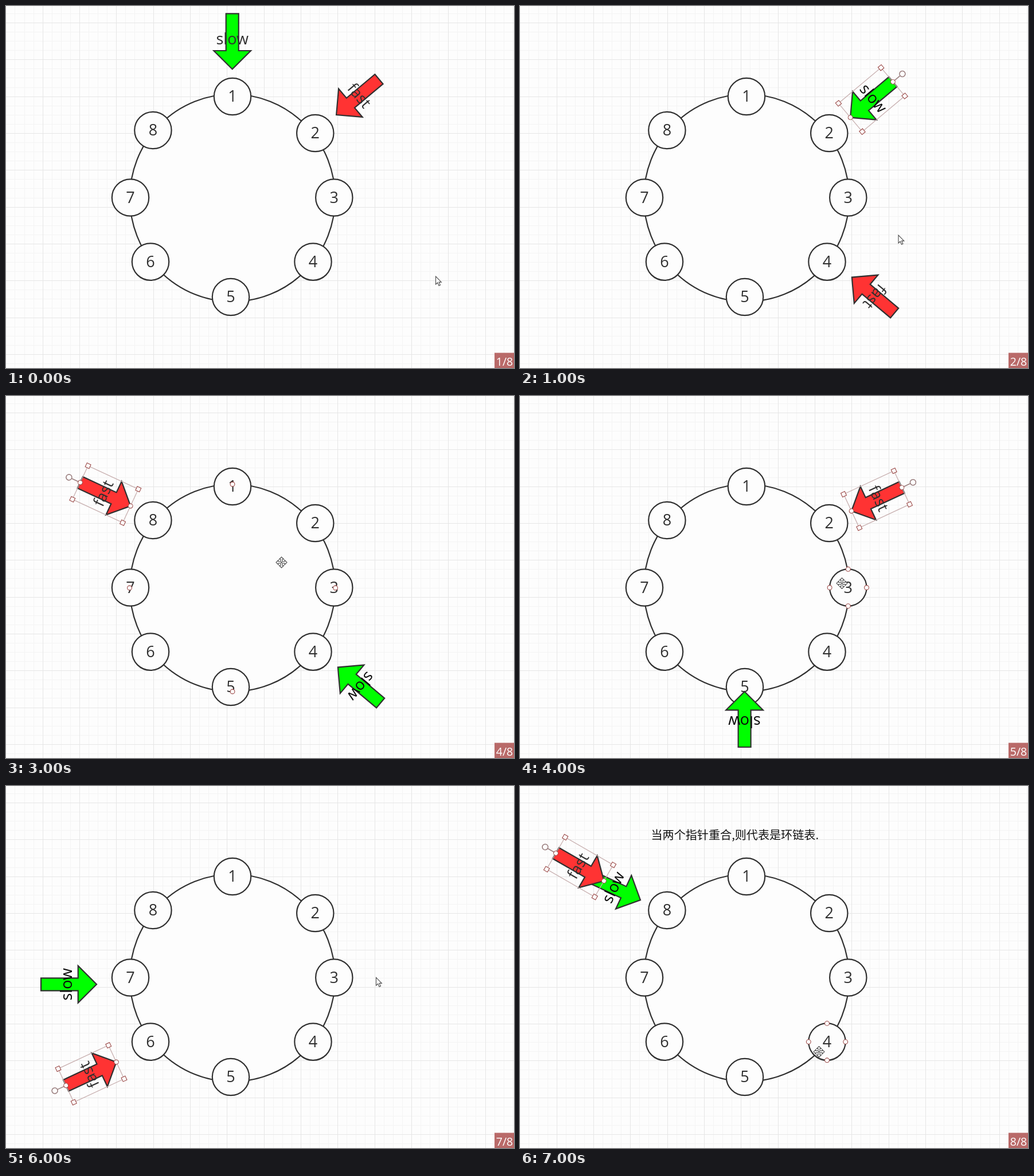
An HTML page that plays this animation: 886x632 px, repeating every 8000 ms.

```html
<!DOCTYPE html>
<html lang="zh-CN">
<head>
<meta charset="utf-8">
<title>Fast and slow pointers</title>
<style>
  html, body { margin: 0; width: 100%; height: 100%; overflow: hidden; background: #fdfdfd; }
  svg { display: block; width: 886px; height: 632px; }
  text { font-family: "Open Sans", "Noto Sans", sans-serif; text-anchor: middle; }
  .shape { stroke: #303030; stroke-width: 2.2; }
  .node { fill: #fdfdfd; }
  .label { font-size: 27px; fill: #303030; }
  .dark { fill: #0a0a0a; }
  .handle { fill: #fff; stroke: #9c4a48; stroke-width: 1.1; }
  .turn { fill: #fff; stroke: #9c8080; stroke-width: 1.6; }
  .frame { fill: none; stroke: #c8b0b0; stroke-width: 1.3; }
  .cursor { fill: #fff; stroke: #4a4a4a; stroke-width: 1.1; }
  .note { font: 20.1px "Noto Sans CJK SC", "Noto Sans CJK", sans-serif; fill: #111; text-anchor: start; }
</style>
</head>
<body>
<svg id="stage" viewBox="0 0 886 632"></svg>
<script>
const STEP_MS = 1000;
const NODE_R = 32.2;
const nodes = [[395, 158], [539.3, 222], [572.3, 334.5], [535.5, 446.6],
               [392, 508], [252, 446.6], [217, 334.5], [256.4, 217]];
const ring = { x: 395, y: 335, rx: 179, ry: 181 };

// slow, fast: centre x, centre y, angle; hover: node number or "ring"
const steps = [
  { slow: [394.7, 61.8, 0], fast: [613.3, 158.8, 50], pointer: [749.5, 472] },
  { slow: [613.3, 163.5, 50], fast: [616, 504.8, 130], selected: "slow", pointer: [660, 400] },
  { slow: [669.7, 334.8, 90], fast: [169.5, 508, 230], selected: "slow", pointer: [572.5, 416.7] },
  { slow: [616, 504.8, 130], fast: [173.3, 171.5, 295], selected: "fast", move: [480.5, 290.5], hover: "ring" },
  { slow: [391.6, 564.5, 180], fast: [622, 180.3, 65], selected: "fast", move: [561.5, 327], hover: 3 },
  { slow: [160.5, 508, 230], fast: [622, 490, 115], selected: "fast", move: [452, 408], hover: "ring" },
  { slow: [109.5, 346.3, 270], fast: [148.5, 502.4, 245], selected: "fast", pointer: [645.5, 334.3] },
  { slow: [166, 178.5, 295], fast: [104.5, 141.5, 300], selected: "fast", move: [521.5, 464], hover: 4,
    note: "当两个指针重合,则代表是环链表." }
];

const dot = (x, y) => `<circle class="handle" cx="${x}" cy="${y}" r="3.9"/>`;
const square = (x, y) => `<rect class="handle" x="${x - 3.7}" y="${y - 3.7}" width="7.4" height="7.4"/>`;
const place = ([x, y, angle = 0], body) =>
  `<g transform="translate(${x} ${y}) rotate(${angle})">${body}</g>`;

function gridLines(spacing, color) {
  let d = "";
  for (let x = 64.2 % spacing; x < 886; x += spacing) d += `M${Math.floor(x) + .5} 0V632`;
  for (let y = 29.5 % spacing; y < 632; y += spacing) d += `M0 ${Math.floor(y) + .5}H886`;
  return `<path d="${d}" stroke="${color}" fill="none"/>`;
}

function arrow(pose, name, fill, dark) {
  return place(pose,
    `<path class="shape" fill="${fill}" d="M-11-48.5H11V16.2H32.3L0 48.5L-32.3 16.2H-11Z"/>
     <text class="label ${dark ? "dark" : ""}" y="5.5">${name}</text>`);
}

function selection(pose) {
  const corners = [[-1, -1], [1, -1], [1, 1], [-1, 1]];
  return place(pose,
    `<rect class="frame" x="-32.3" y="-48.4" width="64.6" height="96.8"/>
     <path class="turn" d="M0-48.4V-65"/>
     <circle class="turn" cy="-70" r="5"/>
     ${corners.map(([x, y]) => square(x * 32.3, y * 48.4)).join("")}${dot(0, -48.4)}${dot(0, 48.4)}`);
}

function hoverDots(target) {
  const [x, y, rx, ry] = target === "ring"
    ? [ring.x, ring.y, ring.rx + .5, ring.ry]
    : [...nodes[target - 1], NODE_R, NODE_R];
  return dot(x, y - ry) + dot(x + rx, y) + dot(x, y + ry) + dot(x - rx, y);
}

function moveCursor(at) {
  const quarter = "L-1.5-1.5V-5.5H-4L0-9.5L4-5.5H1.5V-1.5";
  const arms = [0, 90, 180, 270].map(a => `<path class="cursor" transform="rotate(${a})" d="M-1.5-1.5${quarter}"/>`);
  return place(at, arms.join("") + `<rect x="-1.2" y="-1.2" width="2.4" height="2.4" fill="#4a4a4a"/>`);
}

const pointerCursor = at =>
  place(at, `<path class="cursor" d="M0 0V14L3.2 11L5.5 16.3L7.9 15.2L5.6 10.1H9.8Z"/>`);

const backdrop = gridLines(16.08, "#f4f4f4") + gridLines(64.32, "#e6e6e6") +
  `<ellipse class="shape node" cx="${ring.x}" cy="${ring.y}" rx="${ring.rx}" ry="${ring.ry}"/>` +
  nodes.map((at, i) => place(at,
    `<circle class="shape node" r="${NODE_R}"/><text class="label" y="9.3">${i + 1}</text>`)).join("");

function scene(step, index) {
  return arrow(step.slow, "slow", "#00ff00", index > 0) +
    arrow(step.fast, "fast", "#ff3333", false) +
    (step.selected ? selection(step[step.selected]) : "") +
    (step.hover ? hoverDots(step.hover) : "") +
    (step.note ? `<text class="note" x="228.5" y="93">${step.note}</text>` : "") +
    (step.move ? moveCursor(step.move) : pointerCursor(step.pointer)) +
    `<rect x="852" y="605.5" width="34" height="26.5" fill="#b96a69"/>
     <text x="869.5" y="627.5" font-size="19.5" fill="#fff">${index + 1}/${steps.length}</text>`;
}

const stage = document.getElementById("stage");
stage.innerHTML = backdrop + steps.map((step, i) =>
  `<g class="step" visibility="${i ? "hidden" : "visible"}">${scene(step, i)}</g>`).join("");
const layers = stage.querySelectorAll(".step");
const start = performance.now();

function tick() {
  const current = Math.floor((performance.now() - start) / STEP_MS) % steps.length;
  layers.forEach((layer, i) => layer.setAttribute("visibility", i === current ? "visible" : "hidden"));
  requestAnimationFrame(tick);
}
tick();
</script>
</body>
</html>
```
